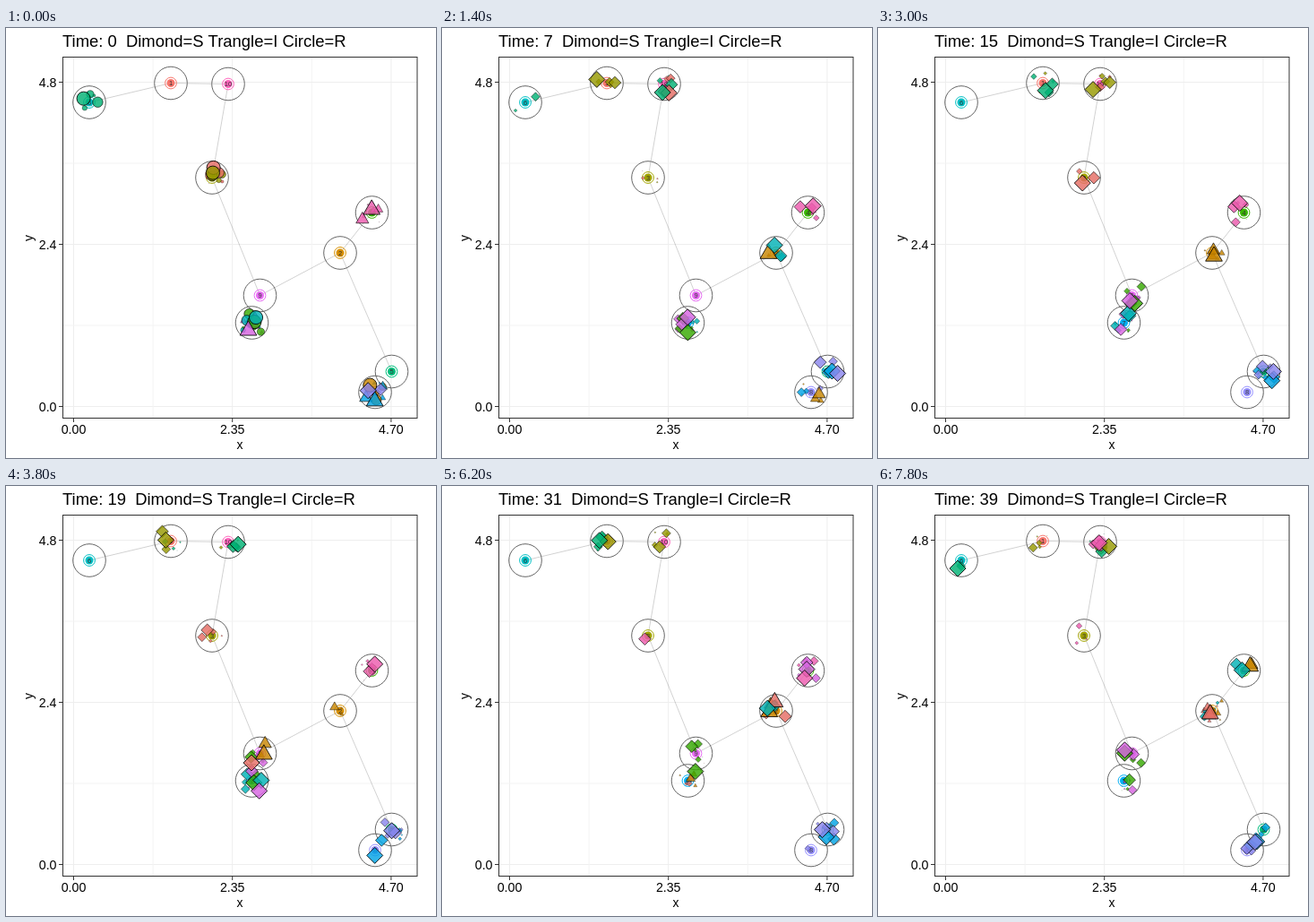
Recreate the animation shown at these times as an HTML page with a canvas. Size 480 by 480 pixels, loop 8000 ms.

```html
<!DOCTYPE html>
<html lang="en">
<head>
<meta charset="utf-8">
<title>Network spread</title>
<style>
  html, body { margin: 0; width: 100%; height: 100%; overflow: hidden; background: #fff; }
  canvas { display: block; width: 480px; height: 480px; }
</style>
</head>
<body>
<canvas id="stage" width="480" height="480"></canvas>
<script>
const ctx = document.getElementById('stage').getContext('2d');
const FONT = '"Liberation Sans", Arial, sans-serif';
const TICK_MS = 200, TICKS = 40, WAKE = 6, SPREAD = 23;

const COLORS = ['#F8766D', '#D89000', '#A3A500', '#39B600', '#00BF7D',
                '#00BFC4', '#00B0F6', '#9590FF', '#E76BF3', '#FF62BC'];
// Nodes 1 to 10; a route digit of 0 means node 10.
const NODES = [[184, 61.5], [373, 251], [230, 167], [408.5, 206], [430.5, 383.5],
               [93, 83], [274.5, 329], [412, 406.5], [283.5, 298.5], [248, 62.5]];
const EDGES = ['61', '10', '03', '39', '92', '24', '25'];

// One agent per colour: the node it has reached at each stop,
// its first shape, and the tick at which it falls ill later on.
const STOPS = [0, 7, 15, 19, 26, 35, 39];
const agents = [
  { route: '3039722', start: 'circle', ill: 31 },
  { route: '8229724', start: 'circle', ill: 3 },
  { route: '3101010', start: 'circle' },
  { route: '7797979', start: 'circle' },
  { route: '6010106', start: 'circle' },
  { route: '7277224', start: 'circle' },
  { route: '8558558', start: 'triangle' },
  { route: '8555588', start: 'diamond' },
  { route: '7797479', start: 'triangle' },
  { route: '4444430', start: 'triangle' }
];

const node = id => NODES[(+id + 9) % 10];
const random = seed => {
  const v = Math.sin(seed * 12.9898 + 4.1) * 43758.5453;
  return v - Math.floor(v);
};

// Between two stops the chance of having hopped to the next node grows.
function nodeAt(route, tick, seed) {
  if (tick <= 0) return node(route[0]);
  const next = STOPS.findIndex(stop => stop >= tick);
  const progress = (tick - STOPS[next - 1]) / (STOPS[next] - STOPS[next - 1]);
  return node(route[random(seed) < progress ? next : next - 1]);
}

function place(i, tick) {
  const seed = i * 307 + (tick + WAKE) * 3;
  const [x, y] = nodeAt(agents[i].route, tick, seed);
  return [x + (random(seed + 1) - .5) * SPREAD, y + (random(seed + 2) - .5) * SPREAD];
}

function shapeAt(agent, tick) {
  if (tick < 2) return agent.start;
  return tick >= agent.ill ? 'triangle' : 'diamond';
}

function line(x1, y1, x2, y2, color) {
  ctx.beginPath();
  ctx.moveTo(x1, y1);
  ctx.lineTo(x2, y2);
  ctx.strokeStyle = color;
  ctx.lineWidth = 1;
  ctx.stroke();
}

function disc(x, y, r, fill, stroke) {
  ctx.beginPath();
  ctx.arc(x, y, r, 0, Math.PI * 2);
  if (fill) { ctx.fillStyle = fill; ctx.fill(); }
  if (stroke) { ctx.strokeStyle = stroke; ctx.lineWidth = 1; ctx.stroke(); }
}

function label(text, x, y, size, align = 'center', color = '#000') {
  ctx.font = `${size}px ${FONT}`;
  ctx.textAlign = align;
  ctx.fillStyle = color;
  ctx.fillText(text, x, y);
}

function outline(shape, x, y, r) {
  ctx.beginPath();
  if (shape === 'circle') {
    ctx.arc(x, y, r * .84, 0, Math.PI * 2);
    return;
  }
  const sides = shape === 'triangle' ? 3 : 4;
  const radius = sides === 3 ? r * 1.2 : r;
  for (let k = 0; k < sides; k++) {
    const angle = k * 2 * Math.PI / sides;
    ctx.lineTo(x + radius * Math.sin(angle), y - radius * Math.cos(angle));
  }
  ctx.closePath();
}

// The wake shows earlier positions, smaller with age.
function marker(i, tick, age) {
  const scale = Math.pow(1 - age / (WAKE + 1), 1.8);
  outline(shapeAt(agents[i], tick), ...place(i, tick), 9 * scale);
  ctx.globalAlpha = .8;
  ctx.fillStyle = COLORS[i];
  ctx.fill();
  ctx.globalAlpha = .06;
  ctx.fillStyle = '#000';
  ctx.fill();
  ctx.globalAlpha = .4 + .45 * scale;
  ctx.strokeStyle = '#000';
  ctx.lineWidth = .4 + .6 * scale;
  ctx.stroke();
  ctx.globalAlpha = 1;
}

function drawAxes() {
  for (let k = 0; k < 5; k++) {
    const x = 75.5 + 88.6 * k, y = 422.5 - 90.5 * k;
    const color = k % 2 ? '#f3f3f3' : '#eeeeee';
    line(x, 33, x, 435, color);
    line(64, y, 459, y, color);
    if (k % 2) continue;
    line(x, 436, x, 440, '#333');
    line(59, y, 63, y, '#333');
    label((2.35 * k / 2).toFixed(2), x, 453, 14.2);
    label((2.4 * k / 2).toFixed(1), 56.5, y + 5, 14.2, 'right');
  }
  label('x', 261, 470, 14);
  ctx.save();
  ctx.translate(30, 234.5);
  ctx.rotate(-Math.PI / 2);
  label('y', 0, 0, 14);
  ctx.restore();
}

function drawNetwork() {
  EDGES.forEach(([a, b]) => line(...node(a), ...node(b), 'rgba(0,0,0,.18)'));
  NODES.forEach(([x, y], i) => {
    disc(x, y, 18.3, null, '#666');
    disc(x, y, 6.4, null, COLORS[i]);
    disc(x, y, 4.5, COLORS[i]);
    label(i + 1, x, y + 2.7, 7.5, 'center', '#333');
  });
}

function draw(tick) {
  ctx.fillStyle = '#fff';
  ctx.fillRect(0, 0, 480, 480);
  label(`Time: ${tick}  Dimond=S Trangle=I Circle=R`, 63, 21, 18.43, 'left');
  drawAxes();
  drawNetwork();
  for (let age = WAKE; age >= 0; age--) {
    agents.forEach((_, i) => marker(i, tick - age, age));
  }
  ctx.strokeStyle = '#333';
  ctx.lineWidth = 1;
  ctx.strokeRect(63.5, 32.5, 395.5, 403);
}

const began = performance.now();
let shown = -1;
function play() {
  const tick = Math.floor((performance.now() - began) / TICK_MS) % TICKS;
  if (tick !== shown) draw(shown = tick);
  requestAnimationFrame(play);
}
play();
</script>
</body>
</html>
```
